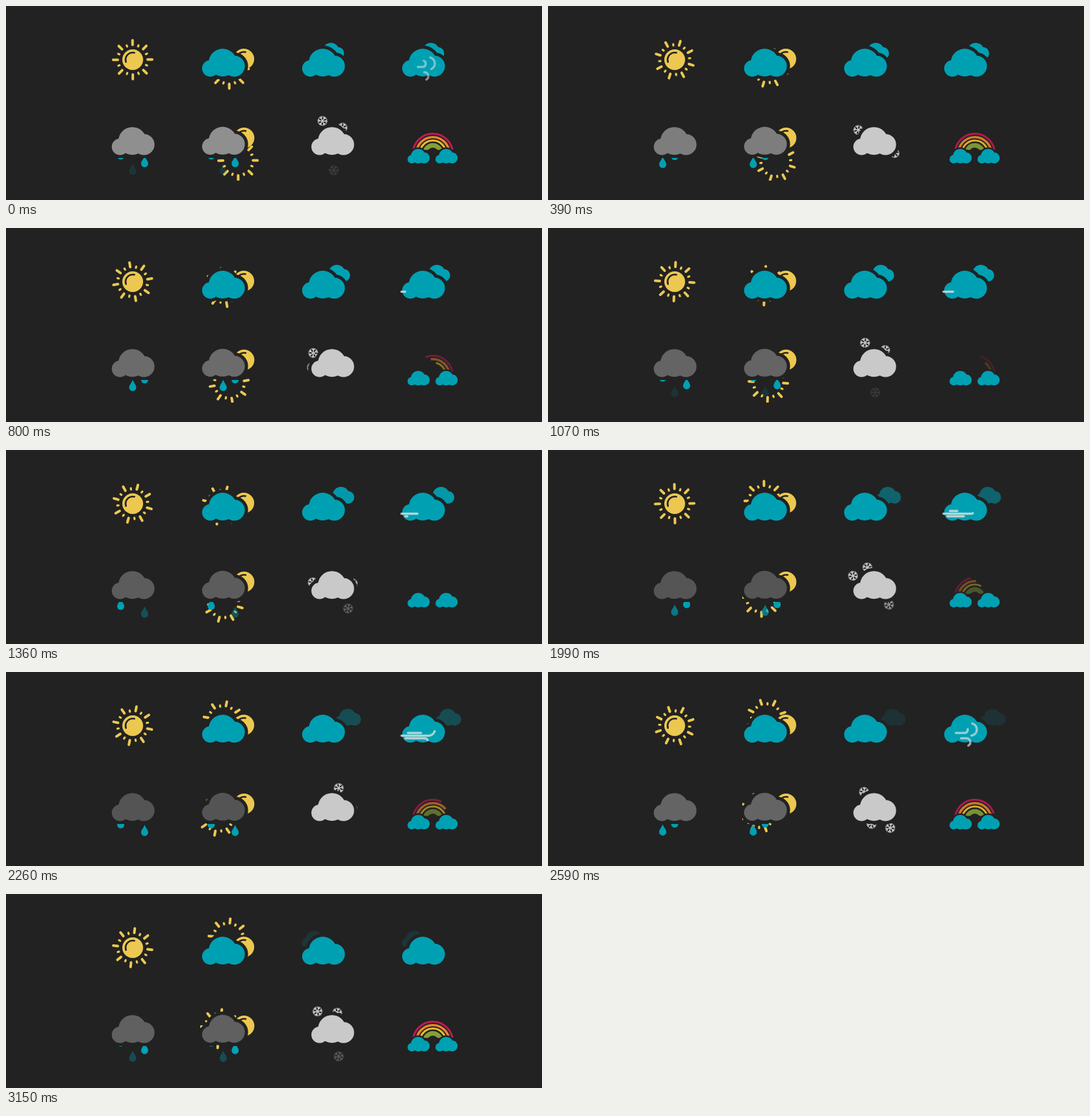
An HTML page with a canvas that plays this animation: 825 px wide and 300 px high, repeating every 3250 ms.

```html
<!DOCTYPE html>
<html lang="en">
<head>
<meta charset="utf-8">
<title>Weather icons</title>
<style>
html, body { margin: 0; width: 100%; height: 100%; overflow: hidden; background: #222; }
canvas { display: block; }
</style>
</head>
<body>
<canvas id="stage" width="825" height="300"></canvas>
<script>
const ctx = document.getElementById('stage').getContext('2d');
const BG = '#222', TEAL = '#00a0b3', GOLD = '#ecc850', PALE = '#c9c9c9';
const TAU = Math.PI * 2, LOOP = 3.25, LAST = 3.15;
const FALL = 1.065;               // seconds for one drop or flake
const PHASES = [0.26, 0.92, 0.59]; // left, middle, right

const cloudShape = new Path2D();
for (const [x, y, r] of [[0, 0, 21.5], [-19, 9, 12.7], [17.8, 5.5, 16.3]]) {
  cloudShape.moveTo(x + r, y);
  cloudShape.arc(x, y, r, 0, TAU);
}
const dropShape = new Path2D(
  'M0-17.5C2-12 5.5-9.5 5.5-5.5A5.5 5.5 0 0 1-5.5-5.5C-5.5-9.5-2-12 0-17.5Z');
const flakeShape = new Path2D();
for (let i = 0; i < 6; i++) {
  const arm = new Path2D('M0 0V-7.2M-2.4-6.6L0-4.2L2.4-6.6');
  flakeShape.addPath(arm, new DOMMatrix().rotate(i * 60));
}

// Each gust: path, head position over time, tail position over time.
const GUSTS = [
  ['M608.7 98.5H650a10 9.6 0 0 0 3-18.8',
    [0.62, 0, 0.8, 5.5, 1.36, 24.5, 1.69, 35.5, 2.26, 54, 2.59, 70],
    [2.26, 0, 2.59, 43, 2.75, 46, 3.05, 66]],
  ['M614.7 102.5H644a6 6 0 0 1 3 11.2',
    [1.22, 0, 1.36, 3, 1.69, 14.5, 2.26, 35, 2.59, 46],
    [2.26, 0, 2.59, 21, 2.75, 29, 3.05, 44]],
  ['M618.7 94.3H641a5 5 0 0 0 2-9.6',
    [1.62, 0, 1.69, 1.5, 2.26, 20, 2.59, 31, 2.75, 36],
    [2.26, 0, 2.59, 9, 2.75, 15, 3.05, 34]],
].map(([d, head, tail]) => ({ path: new Path2D(d), head, tail }));

const clamp = v => Math.min(1, Math.max(0, v));

// Linear interpolation through a flat list of time, value pairs.
function key(t, k) {
  if (t <= k[0]) return k[1];
  for (let i = 2; i < k.length; i += 2)
    if (t < k[i]) return k[i - 1] + (k[i + 1] - k[i - 1]) * (t - k[i - 2]) / (k[i] - k[i - 2]);
  return k[k.length - 1];
}

function at(x, y, draw, alpha = 1) {
  ctx.save();
  ctx.translate(x, y);
  ctx.globalAlpha = alpha;
  draw();
  ctx.restore();
}

function clipTo(x, y, w, h, draw) {
  ctx.save();
  ctx.beginPath();
  ctx.rect(x, y, w, h);
  ctx.clip();
  draw();
  ctx.restore();
}

// gap is the dark margin that hides whatever lies behind the cloud
function cloud(x, y, color, scale = 1, gap = 5, alpha = 1) {
  at(x, y, () => {
    ctx.scale(scale, scale);
    if (gap) {
      ctx.strokeStyle = BG;
      ctx.lineWidth = 2 * gap / scale;
      ctx.stroke(cloudShape);
    }
    ctx.fillStyle = color;
    ctx.fill(cloudShape);
  }, alpha);
}

function disc(x, y) {
  ctx.fillStyle = GOLD;
  ctx.beginPath();
  ctx.arc(x, y, 16, 0, TAU);
  ctx.fill();
  ctx.strokeStyle = BG;
  ctx.lineWidth = 2.6;
  ctx.lineCap = 'round';
  ctx.beginPath();
  ctx.arc(x, y, 11, 2.8, 4.95);
  ctx.stroke();
}

// Ray ring turning around a pivot that may lie off its own centre
function rays(t, px, py, dx = 0, dy = 0) {
  at(px, py, () => {
    ctx.rotate((45 * t - 0.5) * TAU / 360);
    ctx.translate(dx, dy);
    ctx.strokeStyle = GOLD;
    ctx.lineCap = 'round';
    for (let i = 0; i < 16; i++) {
      const long = i % 2 === 0;
      ctx.lineWidth = long ? 4 : 3.2;
      ctx.beginPath();
      ctx.moveTo(0, long ? -23 : -22);
      ctx.lineTo(0, long ? -30 : -24);
      ctx.stroke();
      ctx.rotate(TAU / 16);
    }
  });
}

const fallPhase = (t, i) => (PHASES[i] + t / FALL) % 1;
const fallAlpha = u => clamp((0.96 - u) / 0.25);

function rain(t, x) {
  clipTo(x - 30, 235, 60, 35, () => {
    ctx.fillStyle = TEAL;
    for (let i = 0; i < 3; i++) {
      const u = fallPhase(t, i);
      at(x + (i - 1) * 18.4, 228 + 36 * u, () => ctx.fill(dropShape), fallAlpha(u));
    }
  });
}

function snow(t) {
  [[-29.3, 16.2], [-11, 27], [1.4, 33]].forEach(([x, y], i) => {
    const u = fallPhase(t, i);
    at(501.3, 201.3 + 26 * u, () => {
      ctx.rotate(u * TAU);
      ctx.translate(x, y);
      ctx.strokeStyle = PALE;
      ctx.lineWidth = 1.5;
      ctx.lineCap = 'round';
      ctx.stroke(flakeShape);
    }, fallAlpha(u));
  });
}

function driftingCloud(t, x) {
  const again = t > 2.9;
  const dx = again ? -16 + 11.5 * (t - 2.9) : 12.5 + 11.5 * t;
  const alpha = again ? 0.6 * (t - 2.9) : clamp(0.66 * (2.78 - t));
  cloud(x + dx, 69.9, TEAL, 0.6, 0, alpha);
  cloud(x, 87.5, TEAL);
}

function dashed(path, tail, head) {
  if (head <= tail) return;
  ctx.setLineDash([head - tail, 999]);
  ctx.lineDashOffset = -tail;
  ctx.stroke(path);
}

function wind(t) {
  const w = t < 0.5 ? t + 2.75 : t;
  if (w >= 3.05) return;
  at(0, 0, () => {
    ctx.strokeStyle = '#d4dcdd';
    ctx.lineWidth = 3.4;
    ctx.lineCap = 'round';
    for (const g of GUSTS) dashed(g.path, key(w, g.tail), key(w, g.head));
  }, key(w, [2.2, 0.85, 2.59, 0.72, 2.75, 0.58, 3.05, 0]));
}

function rainbow(t) {
  const leaving = t < 1.4;
  const tail = leaving ? Math.max(0, 75 * (t - 0.32)) : 0;
  const head = leaving ? 100 : Math.max(0, 75 * (t - 1.44));
  const alpha = leaving ? clamp(1.3 - t) : clamp((t - 1.45) / 1.3);
  const bands = [['#bf1b54', 30.5, 3], ['#e8842e', 25.3, 3.6], ['#ecc02e', 20, 3], ['#85a03a', 12.5, 7]];
  at(657, 228, () => {
    ctx.lineCap = 'butt';
    for (const [color, r, width] of bands) {
      const arc = new Path2D();
      arc.arc(0, 0, r, Math.PI, TAU);
      ctx.strokeStyle = color;
      ctx.lineWidth = width;
      dashed(arc, tail, head);
    }
  }, alpha);
  ctx.fillStyle = BG;
  ctx.fillRect(622, 222.5, 70, 8);
  for (const x of [634.5, 677.5]) cloud(x, 232.2, TEAL, 0.52, 2.5);
}

function draw(t) {
  ctx.fillStyle = BG;
  ctx.fillRect(0, 0, 825, 300);

  rays(t, 195, 83);
  disc(195, 83);

  rays(t, 347.8, 82.6, -4.5, 14.9);
  disc(366, 82);
  cloud(333.5, 87.5, TEAL);

  driftingCloud(t, 487.5);
  driftingCloud(t, 641.5);
  wind(t);

  const g = key(t, [0, 143, 0.8, 107, 1.36, 92, 1.69, 86, 2.26, 84, 2.59, 100, 3.15, 96]);
  const gray = `rgb(${g},${g},${g})`;
  cloud(194.5, 208.7, gray);
  rain(t, 195);

  clipTo(299, 170, 91, 100, () => rays(t, 348.4, 218.7, 8.6, 20.3));
  disc(366.3, 204);
  cloud(333.5, 208.3, gray);
  rain(t, 334.3);

  snow(t);
  cloud(501.7, 208.7, PALE);

  rainbow(t);
}

const start = performance.now();
function tick() {
  draw(Math.min((performance.now() - start) / 1000 % LOOP, LAST));
  requestAnimationFrame(tick);
}
tick();
</script>
</body>
</html>
```
